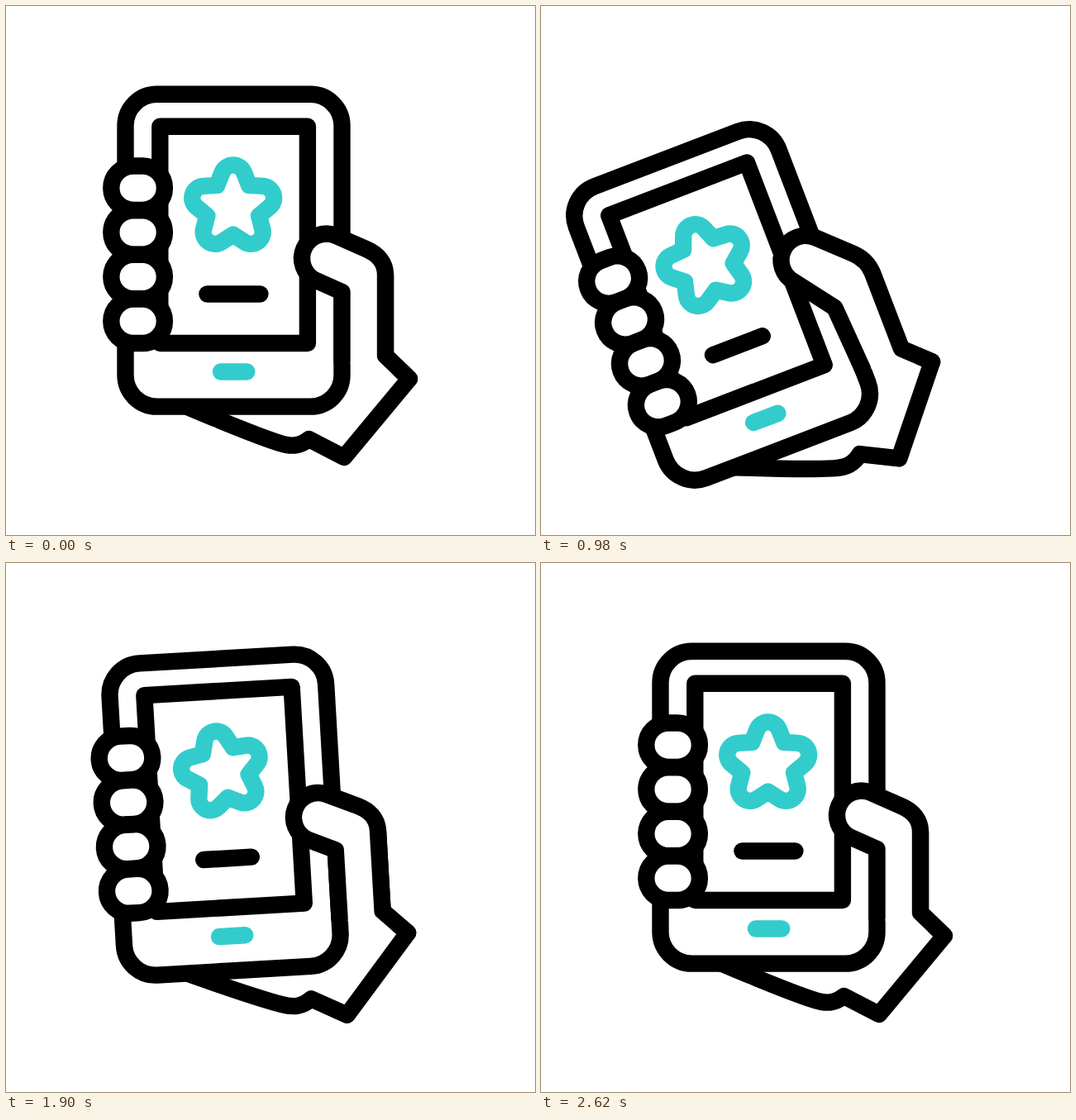
These frames come from a looping animation (640x640 px, 2820 ms). An HTML page:

```html
<!DOCTYPE html>
<html lang="en">
<head>
<meta charset="utf-8">
<title>Phone in hand</title>
<style>
  html, body { margin: 0; width: 100%; height: 100%; overflow: hidden; background: #fff; }
  svg { display: block; width: 100%; height: 100%; }
  .ink { fill: #fff; stroke: #000; stroke-width: 20.4; stroke-linecap: round; stroke-linejoin: round; }
  .teal { stroke: #33cccc; }
</style>
</head>
<body>
<svg viewBox="0 0 640 640">
  <g id="scene" class="ink">
    <path d="M215 483 C262 503 310 522 330 528.5 C345 533.5 355 533 366.5 524 L409 546 L488 451 L459 423 V325 L406 300 Z"/>
    <rect x="144.5" y="106.8" width="262" height="377.8" rx="38"/>
    <rect x="186.3" y="145.8" width="178.6" height="262.2"/>
    <path class="teal" d="M260 442.5 H291.3"/>
    <path id="bar"/>
    <path id="star" class="teal" fill="none"/>
    <g id="fingers"></g>
    <path id="thumb"/>
  </g>
</svg>
<script>
const LOOP = 2820, STROKE = 20.4;
const $ = id => document.getElementById(id);
const scene = $('scene'), bar = $('bar'), star = $('star'), thumb = $('thumb');

const clamp = x => Math.min(1, Math.max(0, x));
const sine = u => (1 - Math.cos(Math.PI * clamp(u))) / 2;
const decay = u => (1 - Math.exp(-4.7 * u)) / (1 - Math.exp(-4.7));

// Swing of the whole drawing: [time, degrees]
const SWING = [[200, 0], [980, -20.95], [1620, 16.3], [2000, -7], [2328, 3.3], [2620, 0]];
// The star turns once while it and the bar shrink and grow back
const SPIN_START = 980, SPIN_END = 2004;

function swingAt(t) {
  if (t <= SWING[0][0]) return 0;
  for (let i = 1; i < SWING.length; i++) {
    const [t0, a] = SWING[i - 1], [t1, b] = SWING[i];
    if (t < t1) {
      const u = (t - t0) / (t1 - t0);
      return a + (b - a) * (i === 1 ? decay(u) : sine(u));
    }
  }
  return 0;
}

// How far the grip has loosened, 0 to 1
const looseAt = t => t < 980 ? sine((t - 200) / 780) : sine((1600 - t) / 620);

// Five round bumps with a straight-sided valley after each
function starPath() {
  let d = '';
  for (let k = 0; k < 5; k++) {
    const a = k * Math.PI * 0.4, c = Math.cos(a), s = Math.sin(a);
    const at = (x, y) => `${(x * c - y * s).toFixed(2)} ${(x * s + y * c + 3.2).toFixed(2)}`;
    d += `${k ? 'L' : 'M'}${at(-13.3, -42.2)} A14.3 14.3 0 0 1 ${at(13.3, -42.2)} L${at(19.4, -26.7)} `;
  }
  return d + 'Z';
}

function thumbPath(m) {
  const mix = (x0, y0, x1, y1) => `${x0 + (x1 - x0) * m} ${y0 + (y1 - y0) * m}`;
  return `M406.5 430 L${mix(406.5, 346, 401.5, 348)} L${mix(374, 331.5, 366.7, 300.7)}
    A29.6 29.6 0 0 1 ${mix(398, 277.5, 409.7, 260.1)} L${mix(437, 294.7, 446, 295)}
    C${mix(450, 300.5, 454, 303)} ${mix(459, 311, 459, 314)} 459 325 V423 L488 451`;
}

star.setAttribute('d', starPath());
$('fingers').innerHTML = [0, 1, 2, 3].map(i =>
  `<rect y="${193.5 + i * 53.7}" width="64.6" height="53.4" rx="26.7"/>`).join('');
const fingers = [...$('fingers').children];

function draw() {
  const t = performance.now() % LOOP;
  scene.setAttribute('transform', `rotate(${swingAt(t)} 425 481)`);

  const loose = looseAt(t);
  thumb.setAttribute('d', thumbPath(loose));
  fingers.forEach((f, i) => f.setAttribute('x', 127.3 + (3.5 + 0.75 * i) * loose));

  const u = clamp((t - SPIN_START) / (SPIN_END - SPIN_START));
  const size = sine(Math.abs(2 * u - 1));
  const scale = 0.7 + 0.3 * size;
  star.setAttribute('transform', `translate(274.7 240.4) rotate(${360 * sine(u)}) scale(${scale})`);
  star.style.strokeWidth = STROKE / scale;

  const half = 32 * size + 0.01;
  bar.setAttribute('d', `M${275.4 - half} 348.5 H${275.4 + half}`);
  requestAnimationFrame(draw);
}
draw();
</script>
</body>
</html>
```
